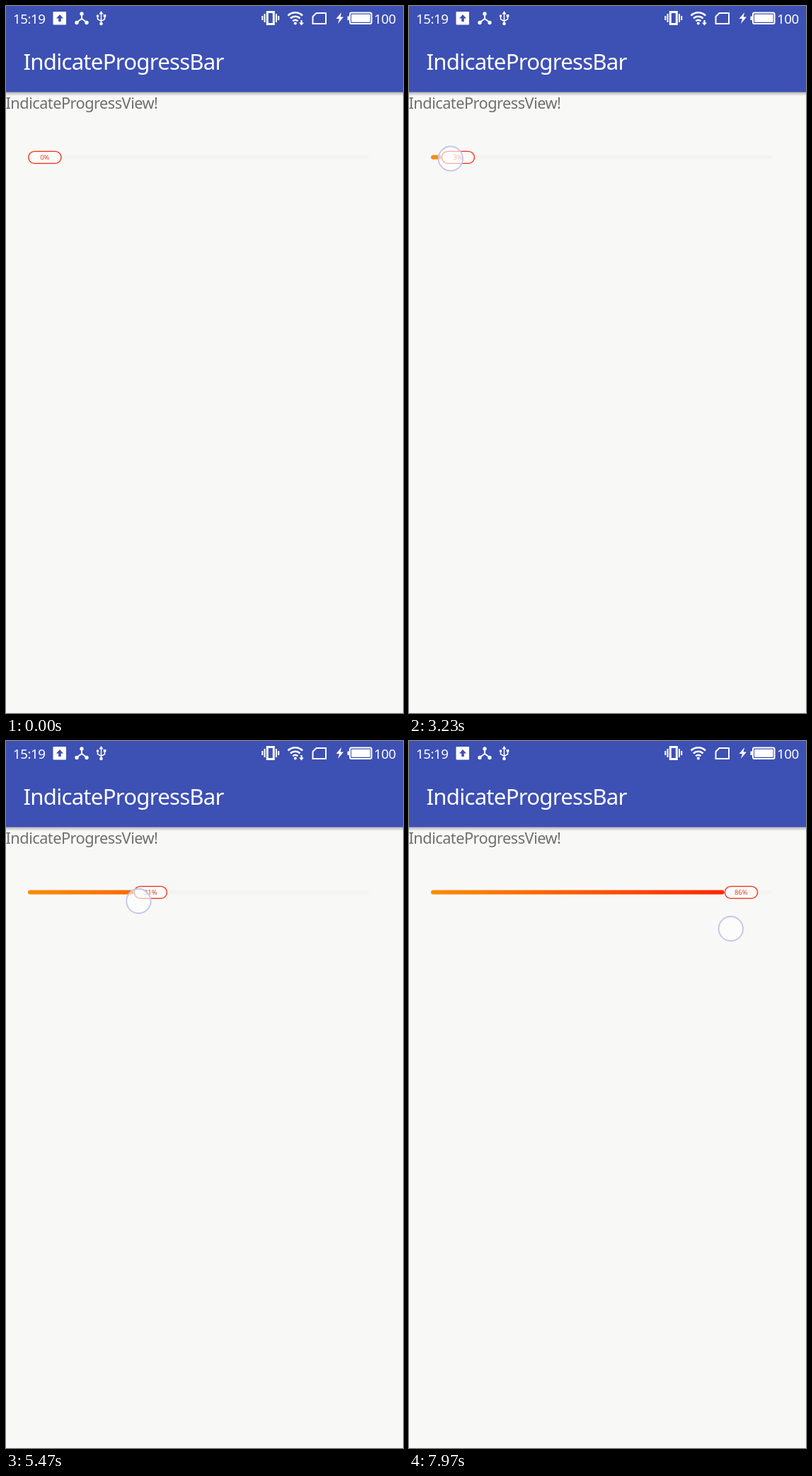
Animation of 561 by 998 pixels, one loop 8000 ms. Source, as an HTML page:

```html
<!DOCTYPE html>
<html lang="en">
<head>
<meta charset="utf-8">
<title>IndicateProgressBar</title>
<style>
  html, body { margin: 0; width: 100%; height: 100%; overflow: hidden; background: #f8f8f7; }
  svg { display: block; width: 561px; height: 998px; font-family: "Noto Sans", "Open Sans", sans-serif; }
  .line { fill: none; stroke: #fff; }
  .tight { letter-spacing: -.025em; }
</style>
</head>
<body>
<svg viewBox="0 0 561 998">
  <defs>
    <linearGradient id="heat" gradientUnits="userSpaceOnUse" x1="31" x2="513">
      <stop stop-color="#fb8c06"/>
      <stop offset="1" stop-color="#ff1600"/>
    </linearGradient>
    <linearGradient id="shade" x2="0" y2="1">
      <stop stop-opacity=".3"/>
      <stop offset="1" stop-opacity="0"/>
    </linearGradient>
  </defs>

  <rect width="561" height="998" fill="#f8f8f7"/>
  <rect y="121" width="561" height="6" fill="url(#shade)"/>
  <rect width="561" height="121.5" fill="#3d50b4"/>

  <!-- status bar -->
  <g fill="#fff" stroke-width="2">
    <g class="tight" font-size="18.7">
      <text x="10" y="25">15:19</text>
      <text x="520" y="25">100</text>
    </g>
    <rect x="66.500" y="8" width="18.500" height="18.500" rx="1"/>
    <path d="M76 12l5 5.500h-3.200v4.500h-3.600v-4.500h-3.200z" fill="#3d50b4"/>

    <path class="line" d="M107 11v7l-7 5M107 18l7 5"/>
    <circle cx="107" cy="11" r="2.700"/>
    <circle cx="100" cy="23.500" r="2.700"/>
    <circle cx="114" cy="23.500" r="2.700"/>

    <path class="line" d="M134.500 10v14M129.500 14v4.500l5 3 5-3v-5" stroke-width="1.500"/>
    <path d="M134.500 7l3 4.500h-6z"/>
    <circle cx="134.500" cy="25" r="2.300"/>
    <circle cx="129.500" cy="14" r="1.800"/>
    <rect x="137.700" y="12" width="3.600" height="3.600"/>

    <path class="line" d="M369.300 8.500h9v17h-9z" stroke-width="3"/>
    <path class="line" d="M365.500 11v12M362.300 14v6M382 11v12M385.200 14v6"/>

    <path class="line" d="M398.500 13.500a14.500 14.500 0 0 1 20.500 0M402 17.500a9.700 9.700 0 0 1 13.500 0M405.300 21.200a5 5 0 0 1 7 0" stroke-width="2.700"/>
    <circle cx="408.800" cy="24.500" r="2"/>
    <path id="download" d="M416.300 20h2.400v3.500h2.300l-3.500 4-3.500-4h2.300z"/>

    <path class="line" d="M433.500 15l5-5h13.500v15h-18.500z"/>
    <path d="M474 9l-7.500 9h4.500l-2 7 8-9.500h-4.500z"/>
    <rect class="line" x="486" y="9.500" width="30.500" height="15.500" rx="2"/>
    <path d="M488 11.700h26.500v11.100h-26.500zM482.500 14.500h2.500v5.500h-2.500z"/>

    <text class="tight" x="24.500" y="90" font-size="31.2">IndicateProgressBar</text>
  </g>
  <text class="tight" x="-.5" y="145" font-size="21.8" fill="#6f6f6f">IndicateProgressView!</text>

  <!-- progress bar -->
  <rect x="31" y="210.500" width="482" height="6" rx="3" fill="#f3f3f2"/>
  <rect id="bar" x="31" y="210.500" height="6" rx="3" fill="url(#heat)"/>
  <g id="pill">
    <rect x=".8" y="205.200" width="46.200" height="17" rx="8.500" fill="#fbfbfa" stroke="#ee4a33" stroke-width="1.600"/>
    <text id="label" x="23.800" y="217" font-size="9.500" text-anchor="middle" fill="#d9482f"></text>
  </g>
  <circle id="touch" r="17.200" fill="#fff" fill-opacity=".6" stroke="#c3c8e6" stroke-width="1.900"/>
</svg>
<script>
  const LOOP = 8000, TOUCH_START = 3030, DOWNLOAD_END = 5800;
  const LEFT = 31, TRACK = 482;

  // time, finger x, finger y, percent
  const path = [
    [3030, 45, 215, 0],
    [3830, 100, 217, 13.2],
    [3950, 114.5, 217, 16.3],
    [4610, 157, 226.5, 25.3],
    [5100, 174, 229, 28.7],
    [5470, 187.3, 226, 31.3],
    [6390, 264, 240, 46.3],
    [7190, 364.5, 258, 68.3],
    [7970, 454.8, 265, 86.3],
  ];
  const $ = id => document.getElementById(id);
  const bar = $('bar'), pill = $('pill'), label = $('label'), touch = $('touch'), download = $('download');

  function sample(t) {
    const next = path.findIndex(key => key[0] > t);
    if (next === 0) return path[0];
    if (next < 0) return path[path.length - 1];
    const a = path[next - 1], b = path[next];
    const k = (t - a[0]) / (b[0] - a[0]);
    return a.map((v, i) => v + (b[i] - v) * k);
  }

  function draw() {
    const t = performance.now() % LOOP;
    const [, x, y, value] = sample(t);
    const percent = Math.floor(value);
    const width = TRACK * percent / 100;
    bar.setAttribute('width', width);
    pill.setAttribute('transform', `translate(${LEFT + width})`);
    label.textContent = percent + '%';
    touch.setAttribute('transform', `translate(${x} ${y})`);
    touch.style.display = t < TOUCH_START ? 'none' : '';
    download.style.display = t < DOWNLOAD_END ? '' : 'none';
    requestAnimationFrame(draw);
  }
  draw();
</script>
</body>
</html>
```
